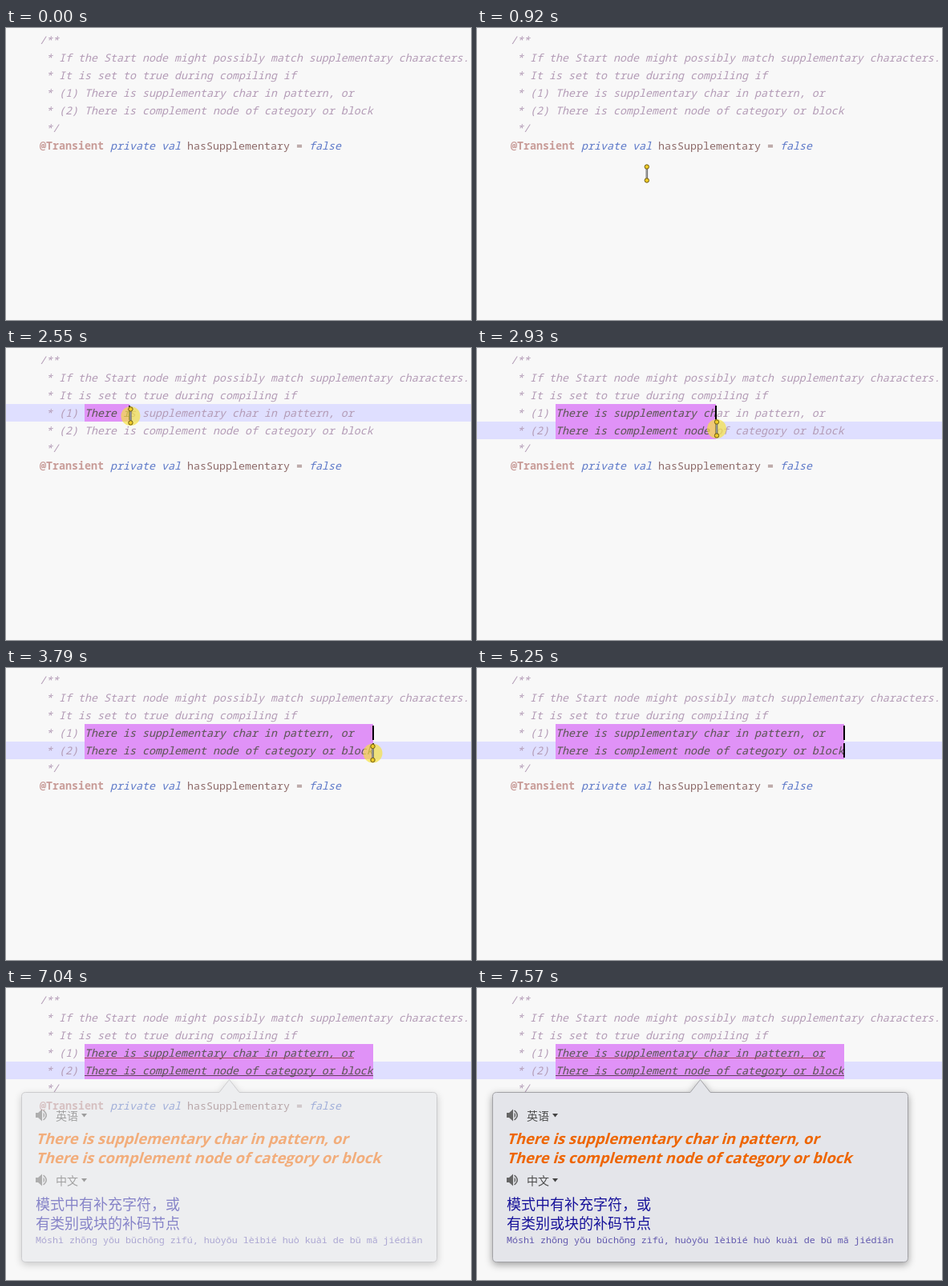
Animation of 580x365 px, one loop 8 s. Source, as an HTML page:

```html
<!DOCTYPE html>
<html lang="en">
<head>
<meta charset="utf-8">
<title>Column selection and translation</title>
<style>
  html, body { margin: 0; width: 100%; height: 100%; overflow: hidden; background: #f8f8f8; }
  svg { display: block; width: 580px; height: 365px; }
  text { white-space: pre; }
  .code { font: 13.333px "Noto Sans Mono", "DejaVu Sans Mono", monospace; }
  .doc { font-style: italic; fill: #b39bb6; }
  .ann { font-weight: 700; fill: #c89c98; }
  .key { font-style: italic; fill: #5c78c8; }
  .name { fill: #8d6a69; }
  .picked { font-style: italic; fill: #62525f; }
  .wait { font: 18.4px "Open Sans", "Noto Sans", sans-serif; fill: #9c9c9c; }
  .lang { font: 14px "Noto Sans CJK SC", "Noto Sans CJK", sans-serif; fill: #4c4c4c; }
  .from { font: 700 18.4px "Open Sans", "Noto Sans", sans-serif; fill: #ee6500; }
  .to { font: 18px "Noto Sans CJK SC", "Noto Sans CJK", sans-serif; fill: #17129a; }
  .pinyin { font: 500 11.667px "Noto Sans Mono", monospace; fill: #6259ae; }
  .balloon { fill: #e4e5ea; stroke: #a2a2a6; }
  #query .balloon { fill: #dedfe1; stroke: #cccdd0; }
  .popup { filter: drop-shadow(0 3px 5px rgba(0, 0, 0, .36)); }
  #query { filter: drop-shadow(0 2px 4px rgba(0, 0, 0, .25)); }
</style>
</head>
<body>
<svg viewBox="0 0 580 365">
  <defs>
    <clipPath id="cut"><rect class="range" x="98" y="70" width="0" height="44"/></clipPath>
    <filter id="soft" x="-200%" y="-50%" width="500%" height="200%"><feGaussianBlur stdDeviation="1.3"/></filter>
    <g id="speaker" fill="#666">
      <path d="M-7-3h3l5-4.500v15l-5-4.500h-3z"/>
      <path d="M2.500-3.500q3.500 3.500 0 7z"/>
      <path d="M2.500-6q7.500 6 0 12" fill="none" stroke="#666" stroke-width="1.500"/>
    </g>
    <path id="drop" d="M-3.500-2h7l-3.500 4.500z" fill="#444"/>
  </defs>

  <rect width="580" height="365" fill="#f8f8f8"/>
  <rect id="row" width="580" height="22" fill="#dfdfff"/>
  <rect class="range" x="98" y="70" width="0" height="44" fill="#e092f7"/>
  <g id="code" class="code"></g>
  <g id="picked" class="code" clip-path="url(#cut)"></g>
  <g id="under">
    <path d="M98 87.500H434" stroke="#a8425f"/>
    <path d="M98 109.500H458" stroke="#62425f"/>
  </g>
  <g id="carets"><rect y="72" width="2" height="18"/><rect id="caret2" y="94" width="2" height="18"/></g>

  <g id="pointer">
    <circle id="press" r="12" fill="#f6e23c" fill-opacity=".68"/>
    <path d="M2-6V11" stroke="#000" stroke-opacity=".3" stroke-width="4" filter="url(#soft)"/>
    <path d="M0-8.500V8.500" stroke="#777" stroke-width="2.600"/>
    <path d="M-.4-6V6" stroke="#aaa" stroke-width=".8"/>
    <g fill="#efcb26" stroke="#6b5a18"><circle cy="-8.500" r="2.700"/><circle cy="8.500" r="2.700"/></g>
  </g>

  <g id="query" class="popup">
    <path class="balloon" d="M195.500 130.500H267L278.500 114.500L290 130.500H360.500q5 0 5 5V202.500q0 5-5 5H195.500q-5 0-5-5V135.500q0-5 5-5z"/>
    <g transform="translate(229 169)">
      <path id="spin" d="M-1 11.400A11.400 11.400 0 0 1-10.700-4M1-11.400A11.400 11.400 0 0 1 8 8" fill="none" stroke="#9c9c9c" stroke-width="2.200"/>
    </g>
    <text class="wait" x="249.500" y="176">Querying...</text>
  </g>

  <g id="result" class="popup">
    <path class="balloon" d="M24.500 130.500H266L278.500 114.500L291 130.500H532.500q5 0 5 5V337.500q0 5-5 5H24.500q-5 0-5-5V135.500q0-5 5-5z"/>
    <use href="#speaker" x="44" y="159"/>
    <text class="lang" x="62" y="164.500">英语</text>
    <use href="#drop" x="97.500" y="159"/>
    <text class="from" transform="translate(37 195) skewX(-16)">There is supplementary char in pattern, or</text>
    <text class="from" transform="translate(37 219) skewX(-16)">There is complement node of category or block</text>
    <use href="#speaker" x="44" y="240"/>
    <text class="lang" x="62" y="245.500">中文</text>
    <use href="#drop" x="97.500" y="240"/>
    <text class="to" x="37" y="276.500">模式中有补充字符，或</text>
    <text class="to" x="37" y="300.500">有类别或块的补码节点</text>
    <text class="pinyin" x="37" y="319">Móshì zhōng yǒu bǔchōng zìfú, huòyǒu lèibié huò kuài de bǔ mǎ jiédiǎn</text>
  </g>
</svg>
<script>
const LOOP = 8000, TICK = 77.1, CHAR = 8, LEFT = 42, PICK = 98;
const $ = id => document.getElementById(id);

// row, column, class, text
const words = [
  [0, 0, 'doc', '/**'],
  [1, 1, 'doc', '* If the Start node might possibly match supplementary characters.'],
  [2, 1, 'doc', '* It is set to true during compiling if'],
  [3, 1, 'doc', '* (1) There is supplementary char in pattern, or'],
  [4, 1, 'doc', '* (2) There is complement node of category or block'],
  [5, 1, 'doc', '*/'],
  [6, 0, 'ann', '@Transient'],
  [6, 11, 'key', 'private val'],
  [6, 23, 'name', 'hasSupplementary ='],
  [6, 42, 'key', 'false']
];

function write(parent, [row, col, cls, str]) {
  const el = document.createElementNS('http://www.w3.org/2000/svg', 'text');
  el.setAttribute('class', cls);
  el.setAttribute('x', LEFT + col * CHAR);
  el.setAttribute('y', 20 + row * 22);
  el.textContent = str;
  parent.append(el);
}
words.forEach(w => write($('code'), w));
words.slice(3, 5).forEach(([r, c, , s]) => write($('picked'), [r, c, 'picked', s]));

const line = p => p, easeOut = p => 1 - (1 - p) ** 2, easeIn = p => p ** 1.6;

// pointer path: tick, x, y, easing towards this point
const path = [
  [6, 440, 420, line],
  [7, 400, 358, line],
  [17, 106, 83, easeOut],
  [19, 105.5, 81, line],
  [20, 105.5, 81, line],
  [23, 98, 78.5, line],
  [31, 98, 78.5, line],
  [38, 299, 101, line],
  [42, 414, 107, line],
  [49, 457.5, 106.5, easeOut],
  [60, 457.5, 106.5, line],
  [68, 429, 400, easeIn]
];

function pointerAt(k) {
  if (k <= path[0][0]) return [path[0][1], path[0][2]];
  const i = path.findIndex(p => p[0] >= k);
  if (i < 0) return [429, 400];
  const [k0, x0, y0] = path[i - 1], [k1, x1, y1, ease] = path[i];
  const p = ease((k - k0) / (k1 - k0));
  return [x0 + (x1 - x0) * p, y0 + (y1 - y0) * p];
}

const blinks = [26, 59, 66, 72, 78, 87, 92, 98];
const between = (k, a, b) => k >= a && k < b;
const show = (id, a) => {
  $(id).style.opacity = a;
  $(id).style.display = a ? '' : 'none';
};

function draw(t) {
  const k = Math.floor(t / TICK + 0.05);
  const [x, y] = pointerAt(k);
  $('pointer').setAttribute('transform', `translate(${x} ${y})`);
  show('press', +between(k, 26, 54));

  const [dx, dy] = k < 49 ? [x, y] : [458, 106];
  const cols = k < 32 ? 0 : Math.max(0, Math.round((dx - PICK) / CHAR));
  const second = k >= 32 && dy > 92;
  for (const r of document.querySelectorAll('.range')) {
    r.setAttribute('width', cols * CHAR);
    r.setAttribute('height', second ? 44 : 22);
  }
  show('row', +(k >= 26));
  $('row').setAttribute('y', second ? 92 : 70);

  $('carets').setAttribute('transform', `translate(${PICK - 1 + cols * CHAR} 0)`);
  show('carets', blinks.filter(b => b <= k).length % 2);
  show('caret2', +second);

  show('under', +(k >= 85));
  show('query', between(k, 85, 91) ? [0.28, 0.56][k - 85] || 1 : 0);
  $('spin').setAttribute('transform', `rotate(${(k - 86) * 30})`);
  show('result', k < 91 ? 0 : k < 92 ? 0.5 : 1);
}

const start = performance.now();
function frame() {
  draw((performance.now() - start) % LOOP);
  requestAnimationFrame(frame);
}
frame();
</script>
</body>
</html>
```
